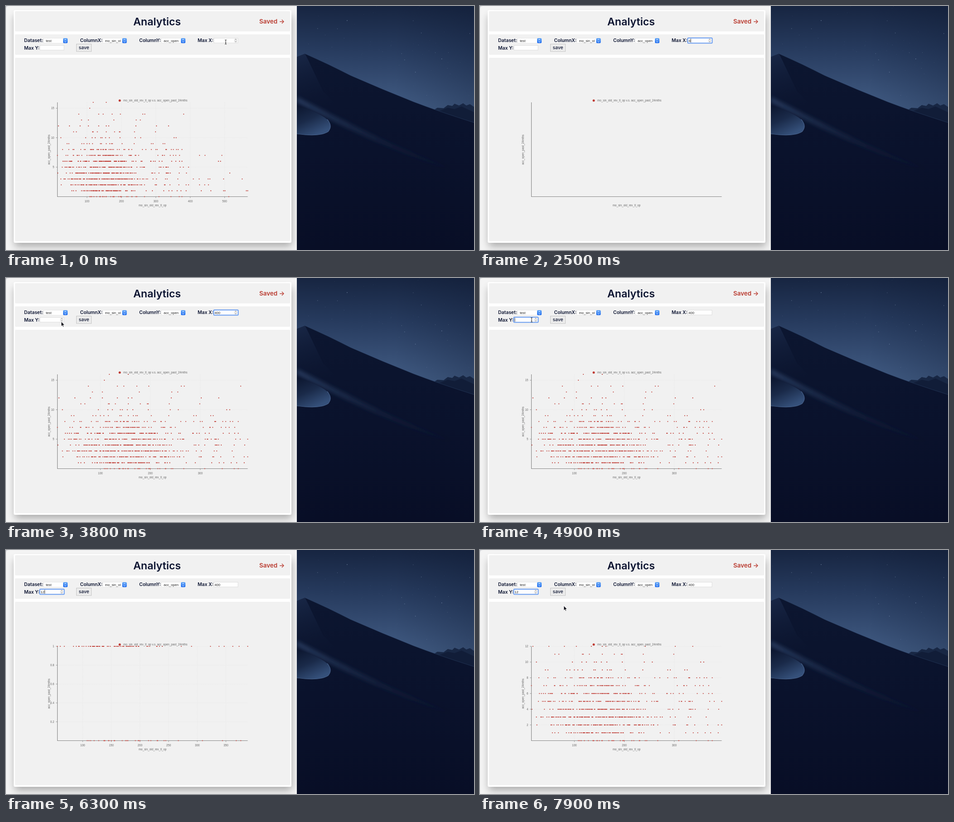
Animation of 1033x542 px, one loop 8 s. Source, as an HTML page:

```html
<!DOCTYPE html>
<html lang="en">
<head>
<meta charset="utf-8">
<title>Analytics</title>
<style>
  html, body { margin: 0; width: 100%; height: 100%; overflow: hidden; background: #f4f4f4; }
  svg { display: block; width: 100vw; height: 100vh; }
  .ui { font-family: Inter, sans-serif; font-weight: 600; fill: #0b1330; }
  .field { font: 7.6px "Liberation Sans", Arial, sans-serif; fill: #222; }
  .chart { font: 6.3px "Liberation Sans", Arial, sans-serif; fill: #666; }
  .mid { text-anchor: middle; }
  .end { text-anchor: end; }
</style>
</head>
<body>
<svg id="stage" viewBox="0 0 1033 542" preserveAspectRatio="none">
  <defs>
    <linearGradient id="sky" x1="0" y1="0" x2="0" y2="1">
      <stop offset="0" stop-color="#172541"/><stop offset=".35" stop-color="#263a5d"/>
      <stop offset=".75" stop-color="#3c557c"/><stop offset="1" stop-color="#49658d"/>
    </linearGradient>
    <linearGradient id="skySide">
      <stop offset="0" stop-color="#0d1830" stop-opacity="0"/><stop offset=".55" stop-color="#0d1830" stop-opacity="0"/>
      <stop offset="1" stop-color="#0d1830" stop-opacity=".28"/>
    </linearGradient>
    <linearGradient id="dune" x1="0" y1="0" x2="0" y2="1">
      <stop offset="0" stop-color="#0c1630"/><stop offset=".5" stop-color="#0a122c"/><stop offset="1" stop-color="#080e26"/>
    </linearGradient>
    <linearGradient id="slope" x1="0" y1="0" x2=".25" y2="1">
      <stop offset="0" stop-color="#1d2d4e" stop-opacity=".75"/><stop offset="1" stop-color="#0c1630" stop-opacity="0"/>
    </linearGradient>
    <linearGradient id="streak">
      <stop offset="0" stop-color="#2b4064" stop-opacity=".85"/><stop offset="1" stop-color="#16233f" stop-opacity="0"/>
    </linearGradient>
    <linearGradient id="bowl" x1="0" y1="0" x2=".55" y2="1">
      <stop offset="0" stop-color="#0c162f"/><stop offset=".5" stop-color="#1a2a49"/><stop offset="1" stop-color="#35507a"/>
    </linearGradient>
    <linearGradient id="blue" x1="0" y1="0" x2="0" y2="1">
      <stop offset="0" stop-color="#64a7f7"/><stop offset="1" stop-color="#1f6df0"/>
    </linearGradient>
    <filter id="soft" x="-20%" y="-20%" width="140%" height="140%"><feGaussianBlur stdDeviation="4"/></filter>
    <filter id="shade" x="-10%" y="-10%" width="120%" height="120%"><feGaussianBlur stdDeviation="9"/></filter>
    <clipPath id="wall"><rect x="642" width="391" height="542"/></clipPath>
    <clipPath id="page"><rect width="642" height="542"/></clipPath>
  </defs>

  <g clip-path="url(#wall)">
    <rect x="642" width="391" height="265" fill="url(#sky)"/>
    <rect x="642" width="391" height="265" fill="url(#skySide)"/>
    <g id="stars" fill="#a9bad6"></g>
    <path d="M940 234L952 226 966 227 975 220 985 222 990 217 1000 221 1009 216 1016 221 1024 218 1033 224V270H940Z" fill="#182744"/>
    <path d="M955 234L975 226 990 229 1005 223 1033 236V270Z" fill="#111d38"/>
    <path d="M642 113L660 106Q712 129 760 154 830 185 900 213 960 236 1033 259V542H642Z" fill="url(#dune)"/>
    <path d="M642 113L660 106 668 122 700 190 760 250 642 208Z" fill="url(#slope)"/>
    <path d="M660 106Q712 129 760 154 830 185 900 213 960 236 1033 259" fill="none" stroke="#2c4468" opacity=".55"/>
    <path d="M642 202Q720 242 800 282T1000 366L960 358Q800 300 642 214Z" fill="url(#streak)" filter="url(#soft)"/>
    <path d="M642 222Q690 236 709 252 722 267 711 279 693 291 642 284Z" fill="url(#bowl)"/>
    <path d="M709 252Q722 267 711 279 693 291 642 284" fill="none" stroke="#4d6a94" stroke-width="1.2" opacity=".8"/>
  </g>

  <g clip-path="url(#page)">
    <rect width="642" height="542" fill="#f4f4f4"/>
    <path d="M0 0H7Q0 0 0 7Z" fill="#d8dade"/>
    <rect x="19" y="22" width="612" height="512" fill="#000" opacity=".3" filter="url(#shade)"/>
    <rect x="17" y="9" width="613" height="517" rx="3" fill="#fff"/>
    <g fill="#f1f1f1">
      <rect x="20" y="11.5" width="607" height="45" rx="2"/>
      <rect x="20" y="63" width="607" height="45.500" rx="2"/>
      <rect x="20" y="115" width="607" height="407.500" rx="2"/>
    </g>
  </g>
  <g class="ui" font-size="10.4">
    <text class="mid" x="333.500" y="43" font-size="23.200">Analytics</text>
    <text x="559" y="39" font-size="13.400" style="fill:#b93a2f">Saved →</text>
    <text x="40" y="80">Dataset:</text>
    <text x="163.500" y="80">ColumnX:</text>
    <text x="294" y="80">ColumnY:</text>
    <text x="423" y="80">Max X:</text>
    <text x="40" y="96.500">Max Y:</text>
    <rect x="155.500" y="84.500" width="33" height="16.500" fill="#ececec" stroke="#c4c4c4"/>
    <text class="mid" x="172" y="96.300" font-weight="500">save</text>
  </g>
  <g id="selects"></g>
  <g id="inputs"></g>
  <g id="chart" class="chart"></g>
  <g id="pointer"></g>
</svg>
<script>
const LOOP = 8000, LAG = 150;
const RED = '#bf3a33';
const $ = id => document.getElementById(id);

function seeded(seed) {
  return () => (seed = (seed * 16807) % 2147483647) / 2147483647;
}

// ---- data ----
const early = [[14,7],[15,4],[17,12],[24,10],[24,3],[25,2],[28,5],[29,8],[30,6],[33,3],
  [34,6],[34,3],[36,5],[37,3],[38,6],[39,7],[39,5],[40,4]];
const sparse = {
  16: [118,156], 15: [108],
  14: [76,134,147,173,197,262,268,381],
  13: [84,104,178,243,255],
  12: [49,80,104,134,156,163,242,302,337],
  11: [61,69,116,118,130,156,180,194,196,238,299],
  10: [96,115,124,140,144,154,165,196,240,256,353,359],
  9: [42,47,85,91,100,107,116,139,142,156,166,171,174,202,237,287,292,321,326]
};
const far = {
  8: [331,345,360,365,376], 7: [306,319,342,358,369,427,443,492], 6: [358,369,376,482,488],
  5: [371,380,395], 4: [342,368,389,515], 3: [364,409,426,452,457,497,551],
  2: [367,388,395,427,442,453], 1: [362,373,388,432,460,497,501,563,567], 0: [368,376,512]
};
const rowCounts = [34, 84, 112, 134, 118, 104, 86, 62, 42];

function buildData() {
  const rnd = seeded(4271), pts = [...early];
  for (const rows of [sparse, far])
    for (const y in rows) for (const x of rows[y]) pts.push([x, +y]);
  rowCounts.forEach((count, y) => {
    const low = y < 2 ? 49 : 41;
    while (count > 0) {
      const bell = 152 + 92 * (rnd() + rnd() + rnd() - 1.5);
      const x = Math.round(rnd() < .66 ? bell : 42 + 310 * rnd() ** 1.25);
      if (x >= low && x < 358) { pts.push([x, y]); count--; }
    }
  });
  return pts;
}
const data = buildData();

// ---- chart ----
const L = 113.5, R = 533.5, T = 214, B = 423.5;

function ticks(lo, hi) {
  const raw = (hi - lo) / 5, base = 10 ** Math.floor(Math.log10(raw)), e = raw / base;
  const step = base * (e >= 7.07 ? 10 : e >= 3.16 ? 5 : e >= 1.41 ? 2 : 1);
  const out = [];
  for (let i = Math.ceil(lo / step); i * step <= hi + 1e-9; i++)
    if (i) out.push(+(i * step).toFixed(2));
  return out;
}

function drawChart(maxX, maxY) {
  const pts = data.filter(p => p[0] <= maxX && p[1] <= maxY);
  let grid = '', marks = '', labels = '', dots = '';
  if (pts.length) {
    const xs = pts.map(p => p[0]), ys = pts.map(p => p[1]);
    const x0 = Math.min(...xs), x1 = Math.max(...xs), y0 = Math.min(...ys), y1 = Math.max(...ys);
    const px = x => L + (x - x0) / (x1 - x0) * (R - L);
    const py = y => B - (y - y0) / (y1 - y0) * (B - T);
    for (const v of ticks(x0, x1)) {
      const x = px(v).toFixed(1);
      grid += `M${x} ${T}V${B}`;
      marks += `M${x} ${B}v3`;
      labels += `<text class="mid" x="${x}" y="436.300">${v}</text>`;
    }
    for (const v of ticks(y0, y1)) {
      const y = py(v);
      grid += `M${L} ${y.toFixed(1)}H${R}`;
      marks += `M${L} ${y.toFixed(1)}h-3.5`;
      labels += `<text class="end" x="106.500" y="${(y + 2.3).toFixed(1)}">${v}</text>`;
    }
    dots = pts.map(([x, y]) => `M${px(x).toFixed(1)} ${py(y).toFixed(1)}h.01`).join('');
  }
  $('chart').innerHTML = `
    <path d="${grid}" stroke="#e3e3e3" stroke-width=".7" stroke-dasharray="1.6 1.6"/>
    <path d="M${L} ${T}V${B}H${R}" fill="none" stroke="#858585" stroke-width="1.1"/>
    <path d="${marks}" stroke="#858585" stroke-width=".8"/>${labels}
    <text class="mid" x="323.500" y="445">mo_sin_old_rev_tl_op</text>
    <text class="mid" transform="translate(97 319) rotate(-90)">acc_open_past_24mths</text>
    <circle cx="251" cy="210" r="2.500" fill="${RED}"/>
    <text x="259" y="212.200">mo_sin_old_rev_tl_op v.s. acc_open_past_24mths</text>
    <path d="${dots}" stroke="${RED}" stroke-width="2.100" stroke-linecap="round"/>`;
}

// ---- controls ----
function select(x, label) {
  return `<rect x="${x}" y="71.500" width="53" height="11" rx="2" fill="#fff" stroke="#dcdcdc" stroke-width=".6"/>
    <text class="field" x="${x + 5}" y="79.700">${label}</text>
    <rect x="${x + 43}" y="71.500" width="10" height="11" rx="2" fill="url(#blue)"/>
    <path d="M${x + 46} 76l2 -2 2 2M${x + 46} 78.300l2 2 2 -2" fill="none" stroke="#fff" stroke-width="1"/>`;
}

function input(x, y, text, focus, spin, caret) {
  const ring = focus
    ? `<rect x="${x - .5}" y="${y - .5}" width="54" height="11.500" rx="1.500" fill="#fff" stroke="#6b9df0" stroke-width="2"/>`
    : `<rect x="${x}" y="${y}" width="53" height="10.500" fill="#fff" stroke="#d2d2d2" stroke-width=".7"/>`;
  const arrows = spin
    ? `<rect x="${x + 45.5}" y="${y + 1}" width="5" height="8.500" rx="2" fill="#f4f4f4" stroke="#c9c9c9" stroke-width=".5"/>
       <path d="M${x + 46.5} ${y + 4}l1.500 -1.700 1.500 1.700M${x + 46.5} ${y + 6.500}l1.500 1.700 1.500 -1.700" fill="none" stroke="#666" stroke-width=".8"/>` : '';
  const cx = x + 2 + text.length * 4.3;
  const bar = caret ? `<path d="M${cx} ${y + 1}v8.500" stroke="#222" stroke-width=".9"/>` : '';
  return `${ring}${arrows}<text class="field" x="${x + 1.2}" y="${y + 8}">${text}</text>${bar}`;
}

// ---- timeline ----
const keysX = [[2300, '4'], [2600, '40'], [2900, '400']];
const keysY = [[6000, '1'], [6300, '12']];
const FOCUS_X = 1000, FOCUS_Y = 4700;
const route = [[0, 485, 80], [100, 485, 80], [700, 483, 76], [3200, 483, 76], [3750, 122, 97],
  [4200, 122, 97], [4500, 114, 93], [6900, 114, 93], [7700, 185, 124], [LOOP, 185, 124]];

const typed = (keys, t) => keys.reduce((s, [at, text]) => t >= at ? text : s, '');
const limit = text => text ? +text : Infinity;

function caretOn(t) {
  const starts = [FOCUS_X, FOCUS_Y, ...keysX.map(k => k[0]), ...keysY.map(k => k[0])].filter(s => s <= t);
  return starts.length > 0 && (t - Math.max(...starts)) % 1000 < 500;
}

function pointerAt(t) {
  const i = Math.max(1, route.findIndex(p => p[0] > t));
  const [t0, x0, y0] = route[i - 1], [t1, x1, y1] = route[i];
  const u = (t - t0) / (t1 - t0), e = u * u * (3 - 2 * u);
  return [x0 + (x1 - x0) * e, y0 + (y1 - y0) * e];
}

const inside = (x, y, bx, by) => x >= bx && x <= bx + 53 && y >= by && y <= by + 10;
const arrow = '<path d="M0 0V10.200L2.300 8.100 3.900 11.500 5.500 10.800 4 7.500H7.200Z" fill="#0b0b14" stroke="#fff" stroke-width=".7"/>';
const beam = '<path d="M-2 -5Q0 -5 0 -3.500 0 -5 2 -5M0 -4V4M-2 5Q0 5 0 3.500 0 5 2 5M-1 1H1" fill="none" stroke="#222" stroke-width=".9"/>';

let chartKey, inputKey;
function render(t) {
  const hidden = t >= keysX[0][0] && t < 3200 || t >= keysY[0][0] && t < 6900;
  const [x, y] = pointerAt(t);
  const overX = !hidden && inside(x, y, 459, 71.5), overY = !hidden && inside(x, y, 75, 87.5);
  const onX = t >= FOCUS_X && t < FOCUS_Y, onY = t >= FOCUS_Y;
  const caret = caretOn(t);

  const html = input(459, 71.5, typed(keysX, t), onX, onX || overX, onX && caret) +
    input(75, 87.5, typed(keysY, t), onY, onY || overY, onY && caret);
  if (html !== inputKey) $('inputs').innerHTML = inputKey = html;

  const mx = limit(typed(keysX, t - LAG)), my = limit(typed(keysY, t - LAG));
  const key = mx + '/' + my;
  if (key !== chartKey) { chartKey = key; drawChart(mx, my); }

  const spinner = x > 120 && overY;
  $('pointer').innerHTML = hidden ? '' : (overX || overY) && !spinner ? beam : arrow;
  $('pointer').setAttribute('transform', `translate(${x.toFixed(1)} ${y.toFixed(1)})`);
}

function drawStars() {
  const rnd = seeded(93);
  let out = '';
  for (let i = 0; i < 60; i++) {
    const x = 645 + rnd() * 386, y = rnd() ** 1.2 * 205, r = .25 + rnd() ** 4 * .6;
    if (y < 100 + (x - 660) * .38) out += `<circle cx="${x.toFixed(1)}" cy="${y.toFixed(1)}" r="${r.toFixed(2)}" opacity=".6"/>`;
  }
  $('stars').innerHTML = out;
}

drawStars();
$('selects').innerHTML = select(83, 'test') + select(213.5, 'mo_sin_ol') + select(343, 'acc_open');
const begin = performance.now();
function tick() {
  render((performance.now() - begin) % LOOP);
  requestAnimationFrame(tick);
}
tick();
</script>
</body>
</html>
```
